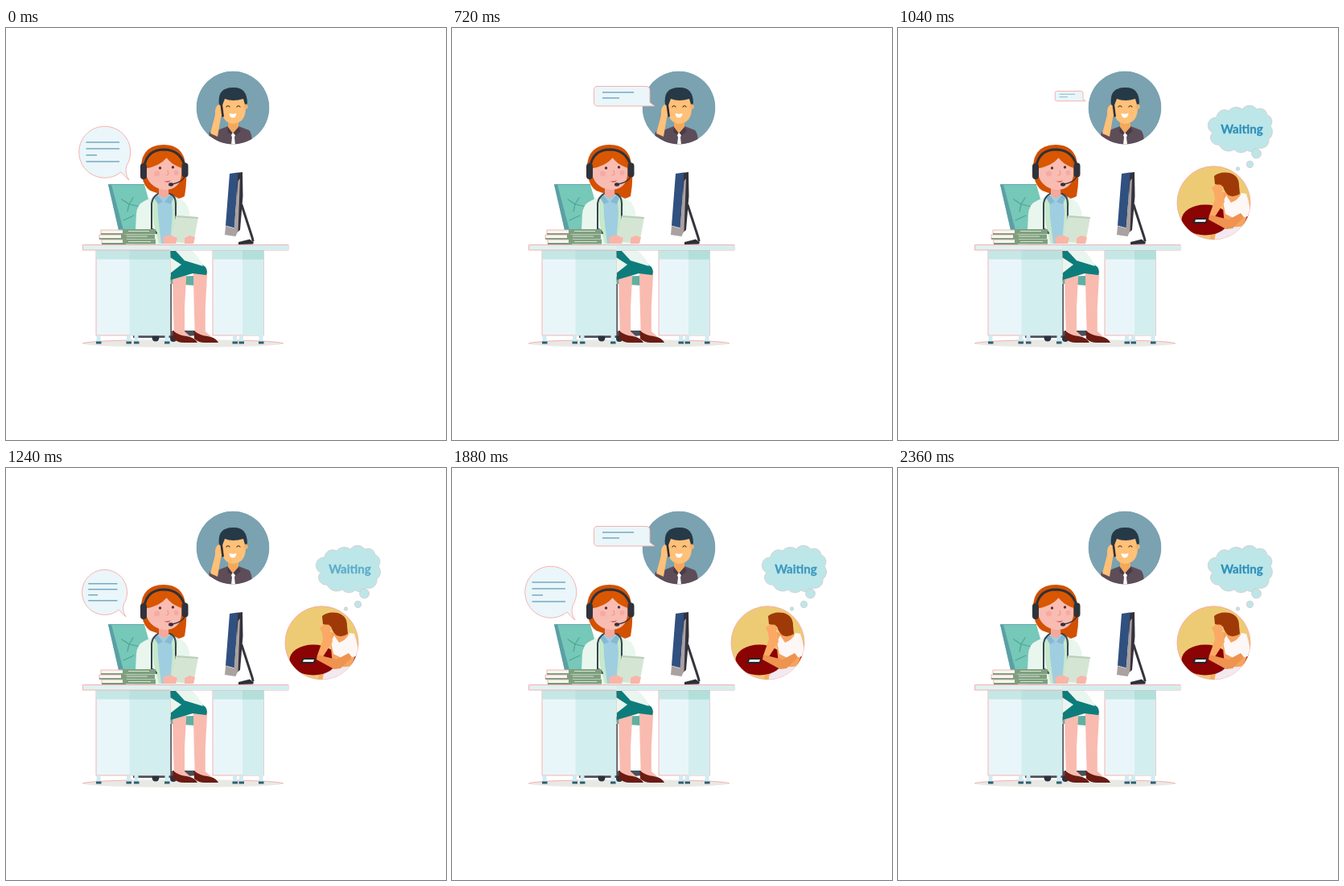
Animation of 547x512 px, one loop 2460 ms. Source, as an HTML page:

```html
<!DOCTYPE html>
<html lang="en">
<head>
<meta charset="utf-8">
<title>Online consultation</title>
<style>
  html, body { margin: 0; width: 100%; height: 100%; overflow: hidden; background: #fff; }
  svg { display: block; width: 547px; height: 512px; }
  .edge { stroke: #f6aaa7; stroke-width: .9; vector-effect: non-scaling-stroke; }
  .line { fill: none; stroke-linecap: round; stroke-linejoin: round; }
  .label { font: 700 15.1px Lato, "Open Sans", sans-serif; fill: #2d8fba; stroke: #2d8fba; stroke-width: .3; text-anchor: middle; }
</style>
</head>
<body>
<svg viewBox="0 0 547 512">
  <defs>
    <clipPath id="callerClip"><circle cx="282" cy="99" r="45.5"/></clipPath>
    <clipPath id="waiterClip"><circle cx="392.5" cy="217.3" r="45.5"/></clipPath>
  </defs>

  <ellipse cx="220" cy="392" rx="125" ry="4.8" fill="#e8e8e4"/>
  <path class="edge" d="M95 392q8-3 62-4M283 388q54 1 62 4" fill="none"/>

  <g id="chair">
    <path d="M127 194.500H172L188 251H140Z" fill="#76c8b8"/>
    <path d="M127 194.500H131L146 251H140Z" fill="#5b9fa5"/>
    <path d="M127 194.500H172" stroke="#6aa5b8"/>
    <path class="line" d="M144 213l9 6 5-8M153 219l-2 9M153 219l13 3M146 239l13-6" stroke="#4fa594" stroke-width="1.200"/>
    <path d="M203 309l30-1 2 12-30-2Z" fill="#5fb0a0"/>
    <path d="M203 318h3v62h-3Z" fill="#4b5a65"/>
    <path d="M158 382l40-2 10-4h28v6l-28 3h-50Z" fill="#46515c"/>
    <circle cx="186" cy="385" r="4.500" fill="#29343f"/>
    <circle cx="208" cy="386" r="4" fill="#29343f"/>
  </g>

  <g id="legs">
    <path id="leg" d="M207 302h17.500l-2.500 46 0 29 9 8-22-4-1-33Z" fill="#f9bbb0"/>
    <use href="#leg" x="25.800"/>
    <path id="shoe" d="M207.500 376q7 6 17 7 11 2 13.500 8h-17q-8 0-13-5Z" fill="#6b1b12"/>
    <use href="#shoe" x="26"/>
    <path d="M204 277h17l27 20q3 5 1 10l-17-2-27 8Z" fill="#0d7d7b"/>
    <path d="M210 276h21q10 10 14 20l-23-7Z" fill="#e9f6ef"/>
    <path d="M204 285l14 9-14 11Z" fill="#e9f6ef"/>
  </g>

  <g id="desk">
    <path class="edge" d="M112 276h92v106h-92Z" fill="#e9f6f9"/>
    <path d="M153.500 276H204v106h-50.500Z" fill="#d3eeef"/>
    <path d="M112 276h92v11.500h-92Z" fill="#c5e7e6"/>
    <path d="M153.500 276H204v11.500h-50.500Z" fill="#b9e1df"/>
    <path class="edge" d="M257 276h63.500v106H257Z" fill="#e9f6f9"/>
    <path d="M294 276h26.500v106H294Z" fill="#d3eeef"/>
    <path d="M257 276h63.500v11.500H257Z" fill="#c5e7e6"/>
    <path d="M294 276h26.500v11.500H294Z" fill="#b3dfdb"/>
    <g id="feet"></g>
  </g>

  <g id="doctor">
    <path d="M169 184q-6-38 27-39 24 0 27 24 3 18-1 40-7 5-18 2l-25-9q-8-6-10-18Z" fill="#d35000"/>
    <path d="M160 270l2-39q1-12 10-16l16-8h17l14 7q8 4 10 20l3 36Z" fill="#e9f6ed"/>
    <path d="M182 213l7-6h17l7 8-5 53h-18l-7-28Z" fill="#c7e8cb"/>
    <path d="M188 208h17l2 22-3 38h-11l-4-34Z" fill="#9fcee0"/>
    <path d="M190 198h12v10q-6 6-12 0Z" fill="#f3a99d"/>
    <path d="M187 206l8 10-6 3-5-8M205 206l-8 10 8 3 3-8" fill="#86b9d2"/>
    <path d="M173 172q12-2 25-12 10 9 20 12 2 18-7 25-8 6-20 3-18-6-18-28Z" fill="#f9bcb2"/>
    <path d="M172 175q0-20 24-26l4 12q-9 11-28 14ZM199 150q18 5 19 24-14-5-19-14Z" fill="#d95700"/>
    <circle cx="187.500" cy="181" r="3.500" fill="#f5aaa3"/>
    <circle cx="211.500" cy="180" r="3" fill="#f5aaa3"/>
    <circle cx="191.500" cy="174" r="1.700" fill="#59302b"/>
    <circle cx="207.500" cy="173" r="1.700" fill="#59302b"/>
    <path class="line" d="M201 177l1 5-3 1" stroke="#ee9288"/>
    <path d="M196 190q5 1.500 9-1-3 5-9 1Z" fill="#d93036"/>
    <path class="line" d="M172 172q3-21 25-21 20 1 25 20" stroke="#2e3138" stroke-width="3"/>
    <rect x="167" y="168" width="8" height="20" rx="4" fill="#30323b"/>
    <rect x="218.500" y="167.500" width="8" height="18" rx="4" fill="#30323b"/>
    <path class="line" d="M222 185q-4 7-15 9" stroke="#30323b" stroke-width="1.500"/>
    <ellipse cx="205" cy="194.500" rx="3" ry="2.200" fill="#30323b"/>
    <path class="line" d="M181 250v-32q1-8 8-12M204 206q7 3 7 12v20M181 250q4 0 6 5" stroke="#34464f" stroke-width="2"/>
    <path d="M205 265l6-32 28 2-6 33Z" fill="#d5e5d4"/>
    <path d="M211 233l28 2-.5 2-28-2Z" fill="#b9ceb9"/>
    <path d="M195 260l9-3 9 4-2 7h-15Z" fill="#f9b5a8"/>
    <path d="M222 261l6-3 7 2-2 8h-11Z" fill="#f9b5a8"/>
  </g>

  <g id="books">
    <path class="edge" d="M118 251h30v5h-30ZM116 257h34v5h-34ZM119 263h30v5h-30Z" fill="#f5f7f0"/>
    <path d="M118 255h30v1.700h-30ZM116 261h34v1.700h-34ZM119 267h30v2h-30Z" fill="#7b987a"/>
    <path d="M145 250h41v6h-41ZM143 256.500h42v5.500h-42ZM145 262.500h41v6h-41Z" fill="#7f9f7e"/>
    <path d="M152 252.500h26M150 259h26M152 265.500h28" stroke="#d8e4d4" stroke-width="1.200"/>
  </g>

  <g id="monitor">
    <path class="line" d="M293 220l13 40 1 4" stroke="#37343d" stroke-width="3"/>
    <path d="M289 266l14-3.500 5 4-1 2-18 .5Z" fill="#302e37"/>
    <path d="M287 180l7-1 .5 30-3.500 42-5 4Z" fill="#34323c"/>
    <path d="M278 181l10.500-1.500-4.500 69-11-3Z" fill="#30507f"/>
    <path d="M288.500 190l2.500-3-2.500 65-3 7-13.500-2 1-11 10.500 3Z" fill="#aaa1a0"/>
  </g>
  <rect class="edge" x="95.500" y="269.500" width="255.500" height="6.500" fill="#def1f1"/>
  <path d="M204 270h147v6H204Z" fill="#d4eeef"/>

  <g id="caller" clip-path="url(#callerClip)">
    <circle cx="282" cy="99" r="45.500" fill="#7aa2b1"/>
    <path d="M250 145l3-16 9 3 1-5 13-5h13l13 5q4 3 4 18Z" fill="#5d4d58"/>
    <path d="M276 113h13v12l-7 9-6-8Z" fill="#f3a95c"/>
    <path d="M268 88q15-9 29 0l1 13q-1 17-15.500 18Q269 118 268 101Z" fill="#ffc078"/>
    <circle cx="298" cy="98" r="2.800" fill="#f8b368"/>
    <path d="M265 96q-3-22 17-22 18-1 18 20l-3 1-2-7q-13 4-23 0l-3 8Z" fill="#263947"/>
    <path class="line" d="M274 98q2-2.500 4 0M287 98q2-2.500 4 0" stroke="#47332d" stroke-width="1.200"/>
    <path d="M277.500 106q4.500 1.500 9 0-.5 5.500-4.500 5.500t-4.500-5.500Z" fill="#fff"/>
    <path d="M254 131l6-23q-1-11 5-13l3 3 1 8-2 6-4 23Z" fill="#ffc078"/>
    <path d="M266.500 96l2.500-1 2 15-2.500 1Z" fill="#302e37"/>
    <path d="M276 123l6 8 7-8 3 5-8 7-9-6Z" fill="#4a3b48"/>
    <path d="M282 130l3 3-1 3 1 9h-5l1-9-1-3Z" fill="#fff"/>
  </g>

  <g id="waiter">
    <circle class="edge" cx="392.500" cy="217.300" r="45.500" fill="#edcb74"/>
    <g clip-path="url(#waiterClip)">
      <path d="M431 232h9v24h-12Z" fill="#980d09"/>
      <path d="M395 253q16-16 35-9l8 21h-45Z" fill="#f2e9f1"/>
      <path d="M389 254h6l-2 12h-5Z" fill="#f6ad5f"/>
      <ellipse cx="382" cy="238.500" rx="29.500" ry="19" fill="#8b0303"/>
      <path d="M402 204l22 2 10 2 4 12-8 26q-13 3-24-2Z" fill="#f5a35e"/>
      <path d="M404 216l4-8 6 9q9-3 13-12l6 1q5 13 5 27l-17 5-14-7Z" fill="#fdf7f6"/>
      <path d="M392 198l9 0 3 8 2 10-13 20-6-3 7-20Z" fill="#fba964"/>
      <path d="M387 232l24 6 15-8 4 5-14 14-8 1-22-12Z" fill="#ee9350"/>
      <path d="M393 184q7-6 19-4 12 3 12 16l1 10q-7 5-14 2-5-4-7-11l-10-3Z" fill="#a03908"/>
      <path d="M390 199q4-6 12-4l2 6-8 9Z" fill="#fba964"/>
      <path d="M369 236h16l-2 7h-17Z" fill="#292326"/>
      <path d="M370 238h13l-1 3h-13Z" fill="#f3eef0"/>
    </g>
  </g>

  <g id="cloud" fill="#bde6e8" stroke="#d5c4c8" stroke-width=".7">
    <path d="M399 145A9 9 0 0 1 391 130 10 10 0 0 1 396 111 10 10 0 0 1 411 103 12 12 0 0 1 428 101 11 11 0 0 1 446 101 9 9 0 0 1 459 108 9 9 0 0 1 463 122 11 11 0 0 1 461 138 10 10 0 0 1 448 149 10 10 0 0 1 434 152 11 11 0 0 1 418 151 13 13 0 0 1 399 145Z"/>
    <circle cx="445.500" cy="156" r="6"/>
    <circle cx="437.500" cy="169.500" r="4.200"/>
    <circle cx="422.500" cy="175" r="2.200"/>
    <text id="cloudText" class="label" x="427.500" y="131">Waiting</text>
  </g>

  <g id="doctorTalk">
    <path class="edge" d="M143 179A32 32 0 1 1 150 171Q147 180 153 189 148 185 143 179Z" fill="#eaf6f9"/>
    <path d="M99.500 142H141M99.500 150H141M99.500 158H113M99.500 166H141" stroke="#78a9c2" stroke-width="1.600"/>
  </g>

  <g id="callerTalk">
    <path class="edge" d="M181 72.500h60q5 0 5 5v15l6 4.500H181q-4.500 0-4.500-5V77.500q0-5 4.500-5Z" fill="#eaf6f9"/>
    <path d="M187 80h39M187 87h21" stroke="#78a9c2" stroke-width="1.600"/>
  </g>
</svg>

<script>
const LOOP = 2460, STEP = 40, FADE = 160;
const byId = id => document.getElementById(id);

byId("feet").innerHTML = [115, 152.5, 162, 200, 284.5, 292.5, 317].map(x =>
  `<path d="M${x - 2.5} 382h5v8h-5Z" fill="#d3eaf0"/>
   <path d="M${x - 3} 389.500h6.500v3h-6.500Z" fill="#2c6070"/>`).join("");

const ease = p => p < .5 ? 2 * p * p : 1 - 2 * (1 - p) ** 2;
const ramp = (t, start) => ease(Math.min(1, Math.max(0, (t - start) / FADE)));

// Starting level, then the moments at which it flips between shown and hidden.
function level(t, shown, ...flips) {
  let value = shown;
  for (const start of flips) {
    const p = ramp(t, start);
    value += shown ? -p : p;
    shown = 1 - shown;
  }
  return value;
}

const show = (el, visible) => el.style.display = visible ? "" : "none";

function zoom(id, x, y, scale) {
  const el = byId(id);
  show(el, scale > .001);
  el.setAttribute("transform", `translate(${x} ${y}) scale(${scale}) translate(${-x} ${-y})`);
}

// The cloud switches hard at half strength; only its text softens.
function fadeCloud(strength) {
  show(byId("cloud"), strength >= .5);
  byId("cloudText").setAttribute("opacity", 1 / (2 - strength));
}

function draw(now) {
  const t = Math.floor(now % LOOP / STEP) * STEP;
  zoom("doctorTalk", 121.5, 156, level(t, 1, 560, 1120, 1920));
  zoom("callerTalk", 214, 84.5, level(t, 0, 240, 960, 1440, 2200));
  zoom("waiter", 392.5, 217.3, level(t, 0, 760));
  fadeCloud(level(t, 0, 880, 1160, 1360, 1840, 2080));
}

const begin = performance.now();
function tick() {
  draw(performance.now() - begin);
  requestAnimationFrame(tick);
}
tick();
</script>
</body>
</html>
```
